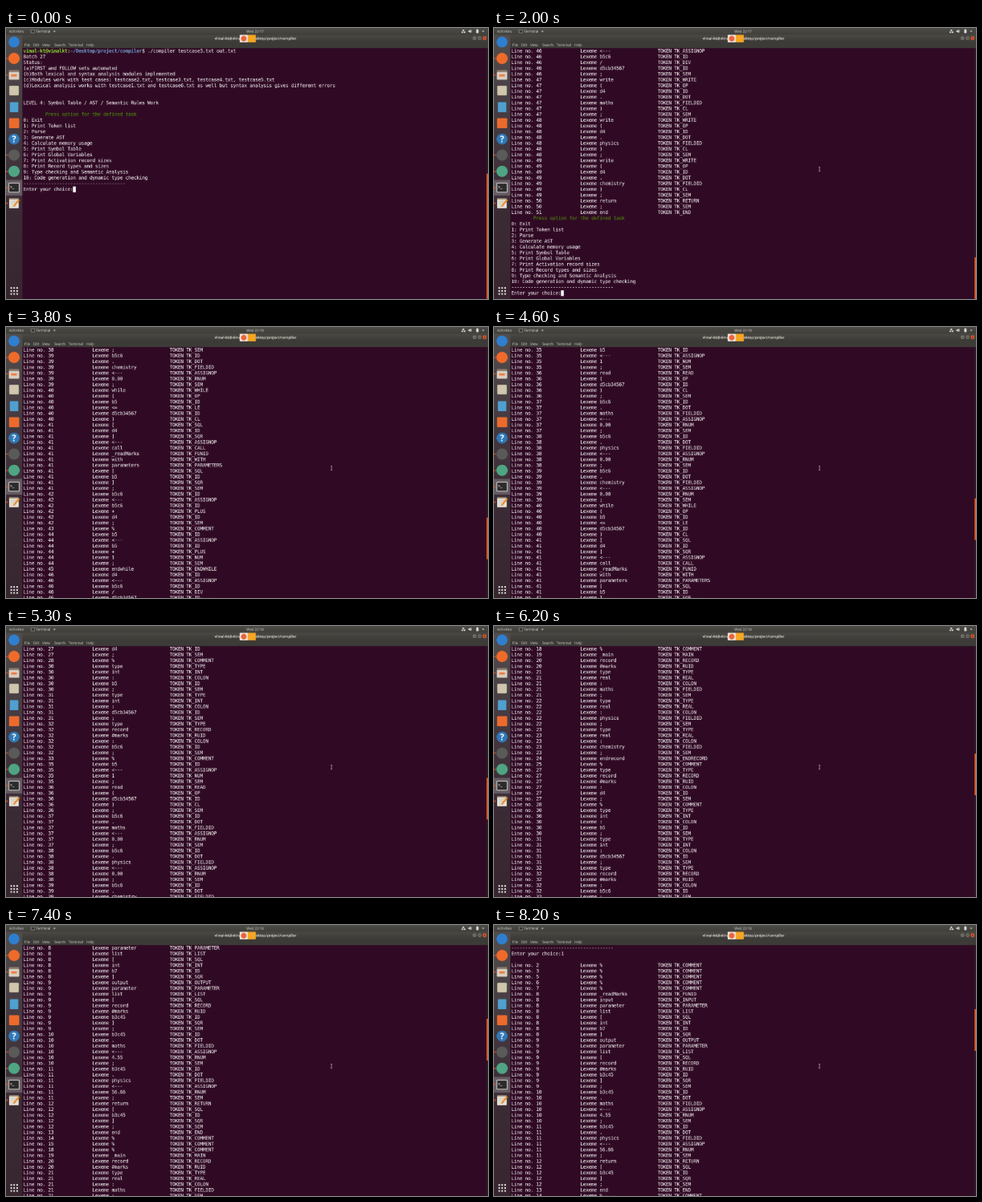
Recreate the animation shown at these times as an HTML page with a canvas. Size 600 by 338 pixels, loop 9 s.

```html
<!DOCTYPE html>
<html lang="en">
<head>
<meta charset="utf-8">
<title>Terminal session</title>
<style>
html, body { margin: 0; width: 600px; height: 338px; overflow: hidden; background: #300a24; }
canvas { display: block; width: 600px; height: 338px; }
</style>
</head>
<body>
<canvas id="stage" width="600" height="338"></canvas>
<script>
const LOOP = 9000, STEP = 100;
const K = 0.3125;                       // desktop pixels to stage pixels
const CHAR = 11 * K, ROW = 23 * K;      // terminal cell
const LEFT = 21.5, TOP = 25.2, VISIBLE = 43, HISTORY = 43;
const TYPED = 300, PRINTED = 600, MINUTE = 3100;
const MONO = '19.5px "DejaVu Sans Mono", monospace';
const UI = '"Open Sans", "Noto Sans", sans-serif';
const USER = 'vimal-kt@vimalkt', PATH = '~/Desktop/project/compiler';

// time in ms, first visible row
const SCROLL = [[3000, 173], [3800, 133], [5300, 93], [6200, 68], [7400, 33], [8200, 23]];
const NOTCH = 5;

const PROGRAM = `2 %
3 %
5 %
6 %
7 %
8 _readMarks input parameter list [ int b7 ]
9 output parameter list [ record #marks b3c45 ] ;
10 b3c45 . maths <--- 4.55 ;
11 b3c45 . physics <--- 56.66 ;
12 return [ b3c45 ] ;
13 end
14 %
15 %
18 %
19 _main
20 record #marks
21 type real : maths ;
22 type real : physics ;
23 type real : chemistry ;
24 endrecord
25 %
27 type record #marks : d4 ;
28 %
30 type int : b5 ;
31 type int : d5cb34567 ;
32 type record #marks : b5c6 ;
33 %
35 b5 <--- 1 ;
36 read ( d5cb34567 ) ;
37 b5c6 . maths <--- 0.00 ;
38 b5c6 . physics <--- 0.00 ;
39 b5c6 . chemistry <--- 0.00 ;
40 while ( b5 <= d5cb34567 )
41 [ d4 ] <--- call _readMarks with parameters [ b5 ] ;
42 b5c6 <--- b5c6 + d4 ;
43 %
44 b5 <--- b5 + 1 ;
45 endwhile
46 d4 <--- b5c6 / d5cb34567 ;
47 write ( d4 . maths ) ;
48 write ( d4 . physics ) ;
49 write ( d4 . chemistry ) ;
50 return ;
51 end`;

const SYMBOLS = {
  '%': 'COMMENT', '[': 'SQL', ']': 'SQR', '(': 'OP', ')': 'CL', ';': 'SEM', ':': 'COLON',
  '.': 'DOT', '<---': 'ASSIGNOP', '<=': 'LE', '+': 'PLUS', '/': 'DIV', _main: 'MAIN'
};

function tokenType(word) {
  if (SYMBOLS[word]) return SYMBOLS[word];
  if (word[0] === '_') return 'FUNID';
  if (word[0] === '#') return 'RUID';
  if (/^\d+$/.test(word)) return 'NUM';
  if (/^\d/.test(word)) return 'RNUM';
  if (/^[bd]\d/.test(word)) return 'ID';
  if (/^(maths|physics|chemistry)$/.test(word)) return 'FIELDID';
  return word.toUpperCase();
}

const tokens = PROGRAM.split('\n').flatMap(line => {
  const [number, ...words] = line.split(' ');
  return words.map(word => `Line no. ${number}`.padEnd(25) +
    `Lexeme ${word}`.padEnd(28) + `TOKEN TK_${tokenType(word)}`);
});

const HINT = '        Press option for the defined task';
const menu = [
  HINT, ...['Exit', 'Print Token list', 'Parse', 'Generate AST', 'Calculate memory usage',
    'Print Symbol Table', 'Print Global Variables', 'Print Activation record sizes',
    'Print Record types and sizes', 'Type checking and Semantic Analysis',
    'Code generation and dynamic type checking'].map((item, i) => `${i}: ${item}`),
  '-'.repeat(37)
];
const ASK = 'Enter your choice:';
const intro = [
  ' '.repeat(USER.length + PATH.length + 1) + '$ ./compiler testcase3.txt out.txt',
  'Batch 27', 'Status:',
  '(a)FIRST and FOLLOW sets automated',
  '(b)Both lexical and syntax analysis modules implemented',
  '(c)Modules work with test cases: testcase2.txt, testcase3.txt, testcase4.txt, testcase5.txt',
  '(d)Lexical analysis works with testcase1.txt and testcase6.txt as well but syntax analysis gives different errors',
  '', '', 'LEVEL 4: Symbol Table / AST / Semantic Rules Work', '', ...menu
];
const waiting = [...intro, ASK];
const typed = [...intro, ASK + '1'];
const printed = [...typed, '', ...tokens, ...menu, ASK];

// The desktop is drawn at full size and then scaled down to the stage.
const desktop = document.createElement('canvas');
desktop.width = 1920;
desktop.height = 1082;
const c = desktop.getContext('2d');
c.scale(1 / K, 1 / K);
const stage = document.getElementById('stage').getContext('2d');
stage.imageSmoothingQuality = 'high';

c.font = MONO;
const TRACKING = `${CHAR / K - c.measureText('0').width}px`;

function text(string, x, y, font, color, align = 'left', tracking = '0px') {
  c.save();
  c.translate(x, y);
  c.scale(K, K);
  c.font = font;
  c.letterSpacing = tracking;
  c.fillStyle = color;
  c.textAlign = align;
  c.fillText(string, 0, 0);
  c.restore();
}

function cells(string, column, y, color, weight = '') {
  text(string, LEFT + column * CHAR, y, weight + MONO, color, 'left', TRACKING);
}

function rect(x, y, w, h, color, radius = 0) {
  c.fillStyle = color;
  c.beginPath();
  c.roundRect(x, y, w, h, radius);
  c.fill();
}

function circle(x, y, r, color) {
  c.fillStyle = color;
  c.beginPath();
  c.arc(x, y, r, 0, 7);
  c.fill();
}

function shape(color, ...points) {
  c.fillStyle = color;
  c.beginPath();
  points.forEach(([x, y]) => c.lineTo(x, y));
  c.fill();
}

function arrow(x, y) {
  shape('#ddd', [x - 1.4, y - 0.8], [x + 1.4, y - 0.8], [x, y + 1]);
}

function gradient(y0, y1, ...colors) {
  const g = c.createLinearGradient(0, y0, 0, y1);
  colors.forEach((color, i) => g.addColorStop(i / (colors.length - 1), color));
  return g;
}

function topRow(t) {
  if (t < PRINTED) return 0;
  const last = SCROLL.length - 1;
  if (t <= SCROLL[0][0]) return SCROLL[0][1];
  if (t >= SCROLL[last][0]) return SCROLL[last][1];
  const i = SCROLL.findIndex(([time]) => time > t);
  const [t0, r0] = SCROLL[i - 1], [t1, r1] = SCROLL[i];
  const notches = (r0 - r1) / NOTCH * (t - t0) / (t1 - t0);
  return r0 - NOTCH * Math.floor(notches + 1e-6);
}

function drawTerminal(t) {
  const rows = t < TYPED ? waiting : t < PRINTED ? typed : printed;
  const top = topRow(t);
  rect(20, 25, 580, 313, '#300a24');
  for (let i = 0; i <= VISIBLE && top + i < rows.length; i++) {
    const row = rows[top + i], y = TOP + i * ROW, base = y + 5.5;
    cells(row, 0, base, row === HINT ? '#4e9a06' : '#fff');
    if (top + i === 0) {
      cells(USER, 0, base, '#8ae234', 'bold ');
      cells(':', USER.length, base, '#fff');
      cells(PATH, USER.length + 1, base, '#729fcf', 'bold ');
    }
    if (top + i === rows.length - 1) rect(LEFT + row.length * CHAR, y, CHAR, ROW, '#fff');
  }
  const unit = 312.8 / (HISTORY + Math.max(rows.length, VISIBLE));
  rect(598, 25, 2, 313, '#2b1a24');
  rect(598.3, TOP + (HISTORY + top) * unit, 1.7, VISIBLE * unit, '#e2622f');
  if (t >= PRINTED) {
    rect(404.8, 173.6, 0.6, 5, '#c9bec6');
    rect(404.2, 173.3, 1.8, 0.5, '#c9bec6');
    rect(404.2, 178.4, 1.8, 0.5, '#c9bec6');
  }
}

function drawBars(t) {
  rect(0, 0, 600, 8.5, gradient(0, 8.5, '#4e4c46', '#403f3a'));
  text('Activities', 4, 5.9, `14px ${UI}`, '#ddd');
  rect(31, 2, 5, 4.4, '#bbb', 0.6);
  rect(31.5, 2.5, 4, 3.4, '#333');
  text('Terminal', 37.5, 5.9, `14px ${UI}`, '#ddd');
  arrow(60.3, 4.4);
  text(t < MINUTE ? 'Wed 22:17' : 'Wed 22:18', 310, 5.9, `14px ${UI}`, '#ddd', 'center');
  // network, volume, battery
  rect(568.3, 1.9, 2, 1.8, '#ddd');
  rect(567, 4.5, 2, 1.8, '#ddd');
  rect(569.8, 4.5, 2, 1.8, '#ddd');
  shape('#ddd', [575.5, 3.3], [576.8, 3.3], [578.5, 1.8], [578.5, 6.4], [576.8, 5], [575.5, 5]);
  rect(579.2, 2.8, 0.6, 2.7, '#ddd');
  rect(585.3, 2.2, 3, 4.3, '#ddd', 0.4);
  rect(586.2, 1.5, 1.2, 0.8, '#ddd');
  arrow(594, 4.3);

  rect(20, 8.5, 580, 9, gradient(8.5, 17.5, '#4b4944', '#3c3b37'));
  rect(20, 17.5, 580, 7.6, '#3c3b37');
  text(`${USER}: ${PATH}`, 310.5, 14.6, `bold 14px ${UI}`, '#dfdbd2', 'center');
  rect(291, 8.5, 10, 9.5, '#f6e9e4');
  circle(296, 13.3, 3.5, '#e8663c');
  rect(301, 8.5, 10, 9.5, '#f5a623');
  circle(583.2, 12.8, 2.3, '#77756d');
  circle(589.6, 12.8, 2.3, '#77756d');
  circle(595.8, 12.8, 2.4, '#e6582a');
  rect(582, 12.8, 2.4, 0.5, '#33322e');
  rect(588.6, 11.8, 2, 2, '#33322e');
  rect(589, 12.2, 1.2, 1.2, '#77756d');
  text('×', 595.8, 14.4, `bold 14px ${UI}`, '#48200f', 'center');
  [['File', 23], ['Edit', 33.5], ['View', 45], ['Search', 60], ['Terminal', 78], ['Help', 100]]
    .forEach(([label, x]) => text(label, x, 22.7, `14.2px ${UI}`, '#dfdbd2'));
}

function drawLauncher() {
  rect(0, 8.5, 20.3, 329.5, gradient(8, 338, '#524e4d', '#453a41', '#3b2b35', '#38262f'));
  rect(0, 189.5, 20.3, 19.5, '#655b62');
  [38, 58.5, 158.5, 179, 199, 218.5].forEach(y => circle(1.1, y, 0.9, '#e95420'));

  circle(10, 17.5, 6.8, '#2f7fd0');
  circle(10, 38, 7, '#f06a2a');
  // file manager
  rect(3.5, 52.5, 13, 12, '#8d7c6d', 1);
  rect(3.5, 55, 13, 9.5, '#d9cfc2', 1);
  rect(6.5, 58, 7, 2.5, '#f0793c', 0.5);
  rect(4, 72, 12, 12, '#cfc6ad', 1.5);
  rect(4.8, 92.5, 10.5, 12.5, '#4f9fd0', 0.8);
  rect(3.7, 112.5, 12.8, 12.5, '#ec6a2c', 1.2);
  circle(10, 138.5, 6.8, '#2f78b7');
  text('?', 10, 142.4, `bold 35px ${UI}`, '#fff', 'center');
  circle(10, 158.5, 7, '#5a5a58');
  circle(10, 178.7, 7, '#4fa583');
  // terminal
  rect(3, 193, 14, 12.3, '#c4c1bd', 1.3);
  rect(4, 194, 12, 10.3, '#2d2a2c', 0.6);
  text('>_', 5, 199.6, 'bold 14px "DejaVu Sans Mono", monospace', '#fff');
  // notepad and pencil
  rect(3.8, 212.5, 12, 12.3, '#eee9dc', 0.8);
  rect(3.8, 212.5, 12, 2, '#b9ab91', 0.6);
  for (let y = 216.5; y < 224; y += 2) rect(5.3, y, 8, 0.5, '#aaa59a');
  shape('#e98a2b', [15.6, 213.5], [17.3, 215], [11, 222.2], [9, 223], [9.5, 220.8]);
  // application grid
  for (let i = 0; i < 9; i++) {
    rect(5.5 + i % 3 * 3.7, 323.2 + Math.floor(i / 3) * 3.7, 2, 2, '#eee', 0.5);
  }
}

const start = performance.now();
let shown = -1;

function frame() {
  const t = Math.floor((performance.now() - start) % LOOP / STEP) * STEP;
  if (t !== shown) {
    shown = t;
    drawTerminal(t);
    drawBars(t);
    drawLauncher();
    stage.drawImage(desktop, 0, 0, desktop.width * K, desktop.height * K);
  }
  requestAnimationFrame(frame);
}
frame();
</script>
</body>
</html>
```
